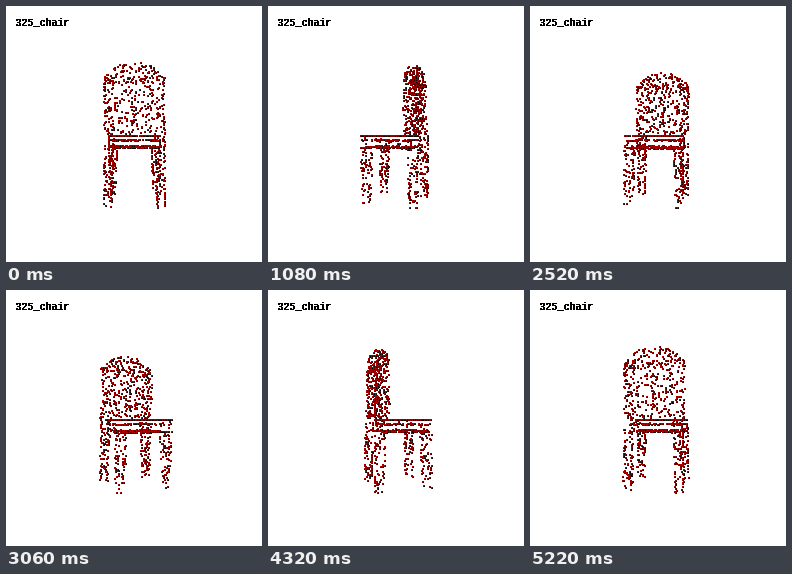
A matplotlib script for the animation above (5.4 s loop, 256 px wide and 256 px high).

```python
import numpy as np
import matplotlib.pyplot as plt
from matplotlib.animation import FuncAnimation

SIZE, FRAMES, STEP_MS = 256, 30, 180
CENTER, CAMERA = 128, 254
HALF_W, TOP, FLOOR = 28, 66, 65.5
FRONT, REAR = -25.5, 16.5

rng = np.random.default_rng(325)
uni = rng.uniform


def seat_half(z):
    """Half width of the seat, narrower towards the back."""
    return np.interp(z, [FRONT, REAR], [HALF_W, 24])


def slab(n, y, spread=0.3):
    """Horizontal seat layer, denser along its front and rear rim."""
    z = uni(FRONT, REAR, n)
    rim = rng.random(n) < 0.35
    z[rim] = rng.choice([FRONT, REAR], rim.sum())
    x = uni(-1, 1, n) * seat_half(z)
    return np.column_stack([x, y + uni(-spread, spread, n), z])


def apron(n):
    """Side walls of the seat."""
    z = uni(FRONT, REAR, n)
    x = rng.choice([-1, 1], n) * seat_half(z)
    return np.column_stack([x, uni(2, 12, n), z])


def back(n):
    """Upright panel with an arched top."""
    x = uni(-HALF_W, HALF_W, n)
    edge = rng.random(n) < 0.08
    x[edge] = rng.choice([-1, 1], edge.sum()) * uni(26.5, HALF_W, edge.sum())
    y = -uni(0, 1, n) * (TOP - 0.0187 * x**2)
    z = np.where(rng.random(n) < 0.5, 16.0, 24.5) + uni(-1.2, 1, n)
    z[edge] = uni(15.5, 25, edge.sum())
    return np.column_stack([x, y, z])


def arch(n):
    x = uni(-HALF_W, HALF_W, n)
    return np.column_stack([x, 0.0187 * x**2 - TOP, uni(16, 25, n)])


def leg(n, sx, z0, top):
    """Square post, slightly splayed and tapered."""
    t = uni(0, 1, n)
    half = 4.2 - 0.8 * t
    u, v = uni(-1, 1, n), rng.choice([-1, 1], n)
    swap = rng.random(n) < 0.5
    a, b = np.where(swap, u, v), np.where(swap, v, u)
    x = sx * (22.8 + 1.4 * t) + a * half
    z = z0 + np.sign(z0) * 0.8 * t + b * half
    return np.column_stack([x, top + t * (FLOOR - top), z])


cloud = np.vstack(
    [back(385), arch(14), slab(170, 1.5), slab(70, 5.8), slab(140, 12.8), apron(14)]
    + [leg(70, sx, -21.5, 13) for sx in (-1, 1)]
    + [leg(88, sx, 22.8, 2) for sx in (-1, 1)]
)

# one dot: lit upper left, dark lower right
DOT = [
    (0, 0, (176, 0, 0)),
    (1, 0, (128, 0, 0)),
    (0, 1, (140, 0, 0)),
    (1, 1, (20, 0, 0)),
]


def render(i):
    a = 2 * np.pi * i / FRAMES
    x, y, z = cloud.T
    px = x * np.cos(a) + z * np.sin(a)
    depth = z * np.cos(a) - x * np.sin(a)
    zoom = CAMERA / (CAMERA - depth)
    cols = np.floor(CENTER + px * zoom).astype(int)
    rows = np.floor(CENTER + y * zoom).astype(int)
    img = np.full((SIZE, SIZE, 3), 255, np.uint8)
    for k in np.argsort(depth):
        for dx, dy, color in DOT:
            img[rows[k] + dy, cols[k] + dx] = color
    return img


fig = plt.figure(figsize=(SIZE / 100, SIZE / 100), dpi=100, facecolor="white")
ax = fig.add_axes([0, 0, 1, 1])
ax.axis("off")
view = ax.imshow(render(0), interpolation="nearest", aspect="auto")
# struck twice for a bold bitmap look
for x in (8.5, 9.5):
    ax.text(x, 19, "325_chair", family="Liberation Mono", size=7.2,
            color="black", va="baseline", antialiased=False)


def update(i):
    view.set_data(render(i))
    return [view]


anim = FuncAnimation(fig, update, frames=FRAMES, interval=STEP_MS,
                     repeat=True, repeat_delay=0, blit=False)
plt.show()
```
